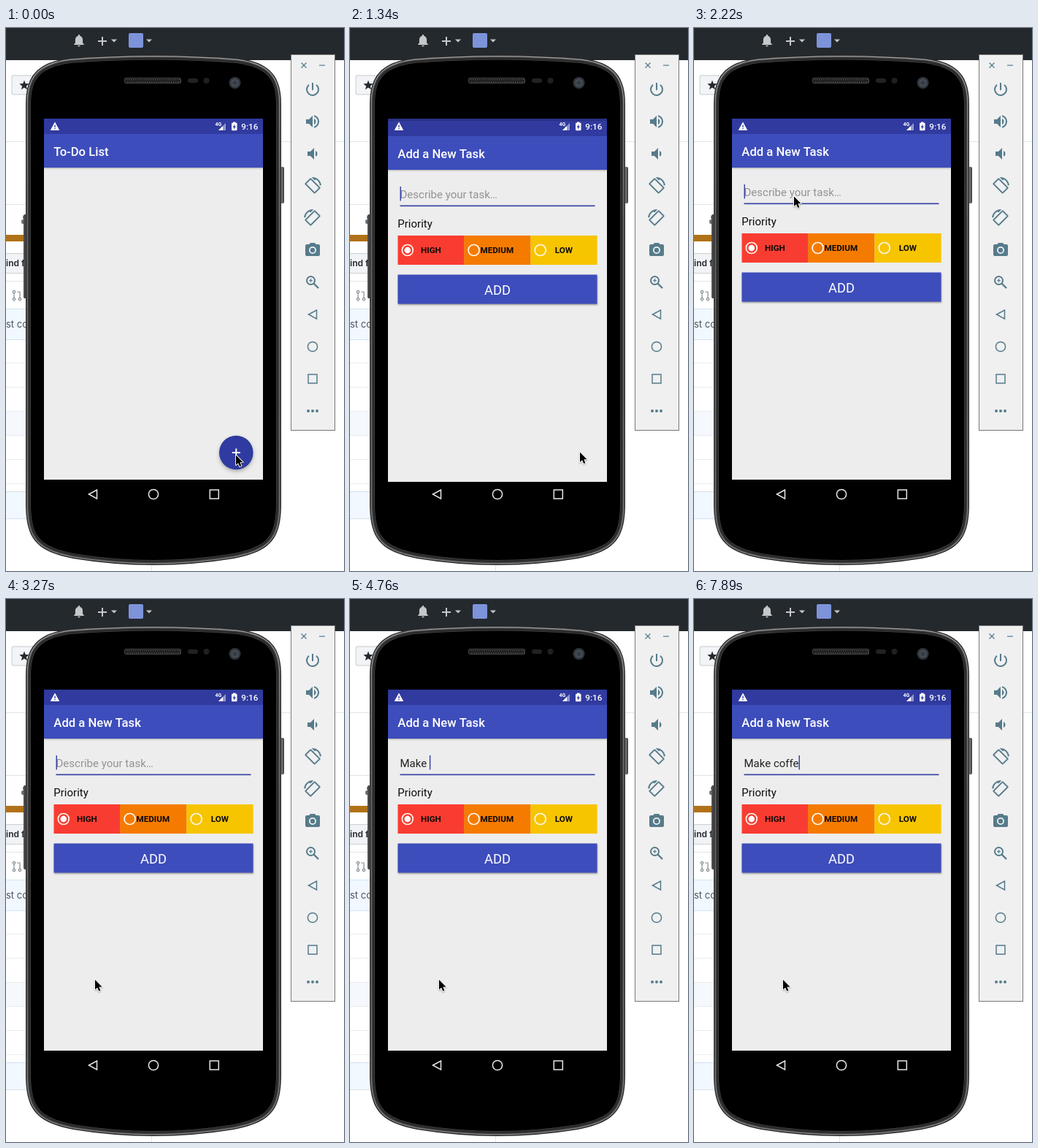
An HTML page with a canvas that plays this animation: 463 px wide and 743 px high, repeating every 8 s.

```html
<!DOCTYPE html>
<html lang="en">
<head>
<meta charset="utf-8">
<title>To-do list demo</title>
<style>
html, body { margin: 0; width: 463px; height: 743px; overflow: hidden; background: #fff; }
canvas { display: block; }
</style>
</head>
<body>
<canvas id="stage" width="463" height="743"></canvas>
<script>
const LOOP = 8000;
const c = document.getElementById('stage').getContext('2d');

// [start, x, y]
const POINTER = [
  [0, 315, 584.5], [150, 315, 588], [450, 315, 584], [600, 315, 580.5],
  [1780, 197, 348], [2220, 137, 230.5], [2370, 133, 300], [2520, 124, 480], [2670, 122, 521]
];
const TYPED = [
  [0, ''], [3870, 'M'], [4020, 'Ma'], [4320, 'Mak'], [4610, 'Make'], [4760, 'Make '],
  [5950, 'Make c'], [6250, 'Make co'], [7150, 'Make cof'], [7300, 'Make coff'], [7890, 'Make coffe']
];
const CARET = [
  [0, true], [1780, false], [2220, true], [2670, false], [3270, true], [3720, false],
  [3870, true], [5360, false], [5810, true], [6700, false], [7150, true], [7740, false], [7890, true]
];
const FAB_COLOR = [[0, '#303ba1'], [1040, '#2e389c'], [1190, '#2d3799']];
const INDIGO = '#3d4dbb';

const at = (steps, t) => steps.findLast(s => s[0] <= t);

function box(x, y, w, h, color) {
  c.fillStyle = color;
  c.fillRect(x, y, w, h);
}

function round(x, y, w, h, r, color) {
  c.beginPath();
  c.roundRect(x, y, w, h, r);
  c.fillStyle = color;
  c.fill();
}

function disc(x, y, r, color) {
  c.beginPath();
  c.arc(x, y, r, 0, 7);
  c.fillStyle = color;
  c.fill();
}

function ring(x, y, r, color, width) {
  c.beginPath();
  c.arc(x, y, r, 0, 7);
  c.strokeStyle = color;
  c.lineWidth = width;
  c.stroke();
}

function poly(points, color) {
  c.beginPath();
  points.forEach(p => c.lineTo(...p));
  c.closePath();
  c.fillStyle = color;
  c.fill();
}

function line(color, width, ...points) {
  c.beginPath();
  points.forEach((p, i) => i ? c.lineTo(...p) : c.moveTo(...p));
  c.strokeStyle = color;
  c.lineWidth = width;
  c.stroke();
}

function text(s, x, y, size, color, weight = 400, family = 'Roboto') {
  c.font = `${weight} ${size}px ${family}, sans-serif`;
  c.fillStyle = color;
  c.fillText(s, x, y);
}

function gradient(x1, y1, x2, y2, ...colors) {
  const g = c.createLinearGradient(x1, y1, x2, y2);
  colors.forEach((color, i) => g.addColorStop(i / (colors.length - 1), color));
  return g;
}

function withShadow(color, blur, dy, draw) {
  c.save();
  c.shadowColor = color;
  c.shadowBlur = blur;
  c.shadowOffsetY = dy;
  draw();
  c.restore();
}

// 24-unit icon centred on (x, y)
function icon(path, x, y, color, { scale = 1, flip = 1, bold = 0 } = {}) {
  const shape = new Path2D(path);
  c.save();
  c.translate(x, y);
  c.scale(scale * flip, scale);
  c.translate(-12, -12);
  c.fillStyle = c.strokeStyle = color;
  c.fill(shape, 'evenodd');
  c.lineWidth = bold;
  if (bold) c.stroke(shape);
  c.restore();
}

function webPage() {
  box(0, 0, 463, 743, '#fff');
  box(0, 0, 463, 44, '#24292e');
  const pale = '#c5c8ca';
  icon('M12 22c1.1 0 2-.9 2-2h-4c0 1.1.9 2 2 2zm6-6v-5c0-3-1.6-5.6-4.5-6.3V4a1.5 1.5 0 0 0-3 0v.7C7.6 5.4 6 8 6 11v5l-2 2v1h16v-1z', 100, 17, pale, { scale: 0.85 });
  box(126, 17, 12, 2, pale);
  box(131, 12, 2, 12, pale);
  poly([[144, 15.5], [152, 15.5], [148, 19.5]], pale);
  round(168, 7, 20, 20, 2, '#7d93da');
  poly([[192, 15.5], [200, 15.5], [196, 19.5]], pale);

  box(0, 155, 463, 1, '#e4e6e9');
  round(7.5, 64.5, 50, 27, 3, '#c9ccd0');
  round(8.5, 65.5, 50, 25, 2, '#f2f4f7');
  const star = Array.from({ length: 10 }, (_, i) => {
    const a = i * Math.PI / 5 - Math.PI / 2, r = i % 2 ? 3 : 7;
    return [25 + r * Math.cos(a), 78.5 + r * Math.sin(a)];
  });
  poly(star, '#24292e');

  box(0, 241, 40, 1, '#dfe2e5');
  disc(26, 259, 3, '#6a737d');
  round(21, 262, 10, 6, 2, '#6a737d');
  box(0, 283, 40, 9, '#b07219');
  box(0, 308, 40, 28, '#cdd0d4');
  box(0, 309, 40, 26, '#f1f3f6');
  text('ind f', 0, 326, 12, '#24292e', 600, 'Inter');
  box(0, 346, 40, 1, '#e2e4e8');
  ring(11, 361, 1.7, '#868c93', 1.2);
  ring(11, 371, 1.7, '#868c93', 1.2);
  ring(19, 371, 1.7, '#868c93', 1.2);
  line('#868c93', 1.2, [11, 363], [11, 369]);
  line('#868c93', 1.2, [15, 361], [19, 361], [19, 369]);
  box(0, 384, 40, 43, '#cfe3f6');
  box(0, 385, 40, 41, '#f1f8ff');
  text('st co', 0, 410, 13, '#4d555e', 400, 'Inter');
  box(0, 524, 40, 33, '#f5f9fd');
  for (let y = 458; y < 630; y += 33) box(0, y, 40, 1, '#e9ebee');
  box(0, 634, 40, 38, '#d4e0ea');
  box(0, 635, 40, 36, '#f1f8ff');
  box(199, 730, 1, 13, '#e1e4e8');
}

function bodyPath(i) {
  const l = 27 + i, r = 377 - i;
  c.beginPath();
  c.moveTo(l, 105);
  c.bezierCurveTo(l, 68, 40 + i, 47 + i, 88, 41 + i);
  c.quadraticCurveTo(202, 32 + i, 316, 41 + i);
  c.bezierCurveTo(364 - i, 47 + i, r, 68, r, 105);
  c.lineTo(r, 650);
  c.bezierCurveTo(r, 700, 362 - i, 716 - i, 312, 726 - i);
  c.quadraticCurveTo(202, 744 - i, 92, 726 - i);
  c.bezierCurveTo(42 + i, 716 - i, l, 700, l, 650);
  c.closePath();
}

function phone() {
  round(24, 255, 6, 115, 2, '#4b4b4b');
  round(374, 190, 7, 50, 2, gradient(376, 0, 381, 0, '#8a8a8a', '#6a6a6a', '#383838'));
  const shine = gradient(0, 36, 0, 735, '#a5a5a5', '#757575', '#757575', '#8c8c8c');
  [[0, '#2a2a2a'], [1.5, shine], [2.7, '#3c3c3c'], [4.5, '#252525'], [6.3, '#484848'], [7, '#000']]
    .forEach(([inset, color]) => {
      bodyPath(inset);
      c.fillStyle = color;
      c.fill();
    });

  round(162, 68, 78, 8, 3, '#454545');
  round(163, 69, 76, 6, 2.5, '#191919');
  for (let x = 165; x < 238; x += 3) {
    box(x, 70, 1.5, 1.5, '#505050');
    box(x + 1, 73, 1.5, 1.5, '#505050');
  }
  round(249, 69, 14, 6, 3, '#222');
  disc(274.5, 72, 4, '#202020');
  disc(313.5, 75, 8, '#30353a');
  disc(313.5, 75, 5.5, '#454c54');
  disc(313.5, 75, 3, '#343c47');
}

function navKeys([bx, by], [cx, cy], [sx, sy], color) {
  c.lineJoin = 'miter';
  c.strokeStyle = color;
  c.lineWidth = 1.5;
  c.beginPath();
  c.moveTo(bx - 5.5, by);
  c.lineTo(bx + 5.5, by - 6);
  c.lineTo(bx + 5.5, by + 6);
  c.closePath();
  c.stroke();
  ring(cx, cy, 6.6, color, 1.5);
  c.strokeRect(sx - 6, sy - 6, 12, 12);
}

function toolbar() {
  const tint = '#567b8b';
  box(390, 36, 61, 515, '#777');
  box(391, 37, 59, 513, '#f0f0f0');
  line(tint, 1.3, [404.5, 47.5], [411.5, 54.5]);
  line(tint, 1.3, [411.5, 47.5], [404.5, 54.5]);
  box(429, 50.5, 8, 1.2, tint);

  line(tint, 2, [420, 75], [420, 85]);
  c.beginPath();
  c.arc(420, 84, 8, -0.9, Math.PI + 0.9);
  c.stroke();

  icon('M3 9v6h4l5 5V4L7 9zM16.5 12c0-1.77-1-3.29-2.5-4v8c1.5-.7 2.5-2.25 2.5-4z' +
    'M14 3.2v2.1c2.9.9 5 3.5 5 6.7s-2.1 5.8-5 6.7v2.1c4-.9 7-4.5 7-8.8s-3-7.9-7-8.8z', 420, 128, tint);
  icon('M5 9v6h4l5 5V4L9 9zM18.5 12c0-1.77-1-3.29-2.5-4v8c1.5-.7 2.5-2.25 2.5-4z', 420, 172, tint);

  const turn = 'M16.5 2.5c3.3 1.5 5.6 4.7 6 8.5H24C23.4 4.8 18.3 0 12 0h-.7l3.8 3.8z' +
    'M10.2 1.75a1.5 1.5 0 0 0-2.1 0L1.75 8.1a1.5 1.5 0 0 0 0 2.1l12 12a1.5 1.5 0 0 0 2.1 0l6.4-6.4a1.5 1.5 0 0 0 0-2.1z' +
    'M14.8 21.2l-12-12 6.4-6.4 12 12z';
  icon(turn, 420, 216, tint, { scale: 0.96, bold: 0.7 });
  icon(turn, 420, 260, tint, { scale: 0.96, flip: -1, bold: 0.7 });

  icon('M9 2L7.2 4H4a2 2 0 0 0-2 2v12a2 2 0 0 0 2 2h16a2 2 0 0 0 2-2V6a2 2 0 0 0-2-2h-3.2L15 2z', 420, 304, tint);
  disc(420, 304, 5, '#f0f0f0');
  disc(420, 304, 3.2, tint);

  ring(417.5, 345.5, 5.5, tint, 2);
  line(tint, 2.4, [421.5, 349.5], [428, 356]);
  line(tint, 1.2, [415, 345.5], [420, 345.5]);
  line(tint, 1.2, [417.5, 343], [417.5, 348]);

  navKeys([420, 392], [420, 436], [420, 480], tint);
  for (const x of [414, 420, 426]) disc(x, 524, 2, tint);
}

function statusIcons() {
  poly([[67, 128.5], [73.3, 140], [60.7, 140]], '#fff');
  box(66.4, 132.5, 1.3, 3.6, '#303a9f');
  box(66.4, 137, 1.3, 1.4, '#303a9f');
  text('4G', 286.5, 134, 7, '#fff', 700);
  poly([[301, 130], [301, 140], [291, 140]], '#9198ce');
  poly([[297, 134], [297, 140], [291, 140]], '#fff');
  round(309, 129.7, 7.5, 10.6, 1, '#fff');
  box(311, 128.6, 3.5, 2, '#fff');
  poly([[313.5, 131.5], [310.6, 136], [312.4, 136], [312, 139], [315, 134.5], [313.2, 134.5]], '#303a9f');
  text('9:16', 322.3, 139, 11.67, '#fff', 500);
}

function appBar(title) {
  withShadow('rgba(0,0,0,.3)', 2, 1, () => box(52, 145, 300, 46, INDIGO));
  text(title, 65.3, 175, 16.67, '#fff', 500);
}

function listScreen(t) {
  box(52, 124, 300, 494, '#ededed');
  appBar('To-Do List');
  withShadow('rgba(0,0,0,.28)', 5, 2.5, () => disc(315.3, 581, 23.3, at(FAB_COLOR, t)[1]));
  box(309.8, 580, 11, 2, '#fff');
  box(314.3, 575.5, 2, 11, '#fff');
}

function option(x, color, label, labelX, checked) {
  box(x, 281, 91.2, 40, color);
  ring(x + 13.3, 301, 7.5, '#fff8ee', 1.7);
  if (checked) disc(x + 13.3, 301, 4.3, '#fff');
  text(label, labelX, 305.3, 11.67, '#0a0a0a', 700);
}

function formScreen(t) {
  const typed = at(TYPED, t)[1];
  box(52, 124, 300, 494, '#ededed');
  appBar('Add a New Task');
  text(typed || 'Describe your task…', 68.5, 230, 15, typed ? '#242424' : '#939393');
  if (at(CARET, t)[1]) box(68.5 + c.measureText(typed).width, 214, 1.5, 19.5, '#3844a4');
  box(68.5, 239.5, 267, 1.7, '#3844a4');
  text('Priority', 65.3, 270, 15, '#0c0c0c');
  option(65.5, '#f93c31', 'HIGH', 97, true);
  option(156.3, '#f57b00', 'MEDIUM', 178.5);
  option(247.4, '#f7c400', 'LOW', 280.8);
  withShadow('rgba(0,0,0,.35)', 2, 1, () => box(65.5, 334.5, 273, 40, INDIGO));
  text('ADD', 184, 361.5, 18.33, '#fff');
}

function screen(t) {
  const entering = t >= 1340 && t < 1480;
  const shift = entering ? 3 : 0;
  c.save();
  c.beginPath();
  c.rect(52, 124, 300, 494 + shift);
  c.clip();
  c.translate(0, shift);
  (t < 1340 ? listScreen : formScreen)(t);
  c.restore();
  box(52, 124, 300, 21 + shift, '#303a9f');
  if (entering) box(52, 124, 300, shift, '#293286');
  statusIcons();
}

function pointer(t) {
  const [, x, y] = at(POINTER, t);
  c.save();
  c.translate(x, y);
  c.scale(0.93, 0.93);
  c.beginPath();
  [[0, 0], [0, 14.5], [3.3, 11.5], [5.6, 16.8], [8, 15.8], [5.8, 10.6], [10.3, 10.4]]
    .forEach(p => c.lineTo(...p));
  c.closePath();
  c.lineJoin = 'round';
  c.lineWidth = 2;
  c.strokeStyle = '#fff';
  withShadow('rgba(0,0,0,.3)', 2, 1, () => c.stroke());
  c.fillStyle = '#000';
  c.fill();
  c.restore();
}

function frame(now) {
  const t = now % LOOP;
  webPage();
  phone();
  screen(t);
  navKeys([119, 638], [202, 638], [285.3, 638], '#e6e6e6');
  toolbar();
  pointer(t);
  requestAnimationFrame(frame);
}

frame(0);
</script>
</body>
</html>
```
